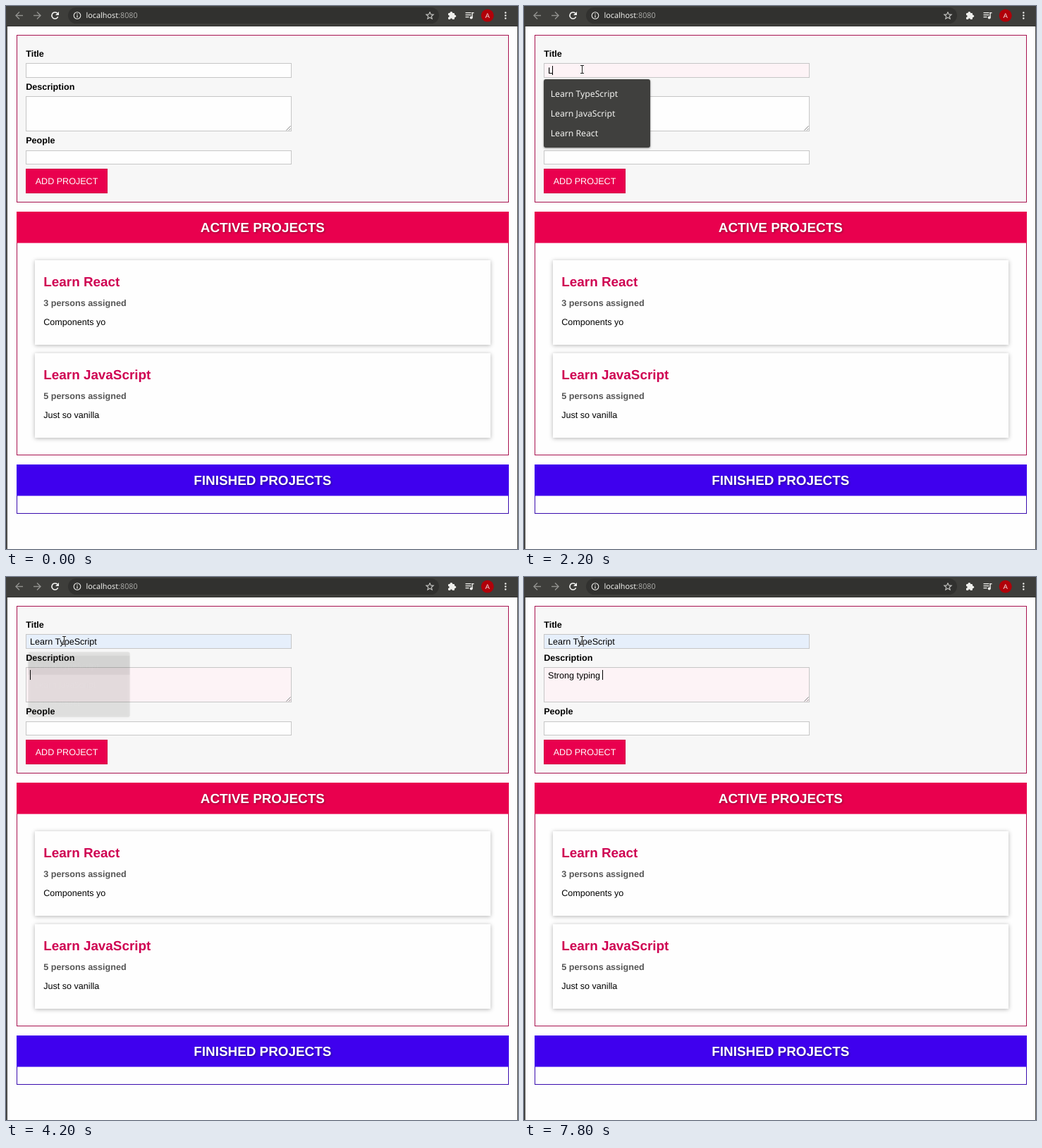
An HTML page with a canvas that plays this animation: 726 px wide and 771 px high, repeating every 8 s.

```html
<!DOCTYPE html>
<html lang="en">
<head>
<meta charset="utf-8">
<title>Project form</title>
<style>
  html, body { margin: 0; width: 100%; height: 100%; overflow: hidden; background: #fefefe; }
  canvas { display: block; }
</style>
</head>
<body>
<canvas id="stage" width="726" height="771"></canvas>
<script>
const ctx = document.getElementById('stage').getContext('2d');
const LOOP = 8000;
const SANS = '"Liberation Sans", Arial, sans-serif';
const UI = '"Noto Sans", "Open Sans", sans-serif';
const BODY = `12.57px ${SANS}`;
const BOLD = `bold 12.57px ${SANS}`;
const HEAD = `bold 18.86px ${SANS}`;
const PINK = '#e9004e', EDGE = '#a8124f', BLUE = '#3f00ee';
const BLUSH = '#fdf3f6', AUTOFILL = '#e6effb';

const ALL = ['Javascript', 'asdfasdfa', 'asdfasdfas', 'Learn TypeScript', 'ddddd', 'fff'];
const MATCHES = ['Learn TypeScript', 'Learn JavaScript', 'Learn React'];

// Step tracks: [start in ms, value], each value held until the next.
const TITLE = [[0, ''], [2200, 'L'], [2300, 'Le'], [2500, 'Lea'], [2600, 'Learn'],
  [2700, 'Learn '], [4000, 'Learn TypeScript']];
const NOTE = [[0, ''], [5500, 'S'], [5700, 'St'], [5800, 'Str'], [6000, 'Stron'], [6100, 'Strong'],
  [6400, 'Strong '], [7200, 'Strong ty'], [7300, 'Strong typ'], [7500, 'Strong typi'],
  [7600, 'Strong typin'], [7700, 'Strong typing'], [7800, 'Strong typing ']];
const FOCUS = [[0, ''], [1200, 'title'], [4000, 'note']];
const CARET = [[0, true], [3300, false], [4000, true], [4500, false], [5000, true],
  [5200, false], [5500, true]];
const POINTER = [[0, null], [800, [43, 84]], [900, [68, 86]], [1100, [82, 90]]];
// Menu values: [opacity, scale]
const MENU = [[0, [0, 1]], [1300, [0.3, 0.97]], [1400, [0.8, 0.99]], [1500, [1, 1]],
  [4000, [0.9, 1]], [4100, [0.5, 0.98]], [4200, [0.09, 0.955]], [4500, [0, 1]]];

function at(track, t) {
  let value;
  for (const [start, v] of track) if (t >= start) value = v;
  return value;
}

function rect(x, y, w, h, color) {
  ctx.fillStyle = color;
  ctx.fillRect(x, y, w, h);
}

function box(x, y, w, h, fill, edge) {
  rect(x, y, w, h, fill);
  ctx.strokeStyle = edge;
  ctx.lineWidth = 1;
  ctx.strokeRect(x + 0.5, y + 0.5, w - 1, h - 1);
}

function pill(x, y, w, h, r, color) {
  ctx.fillStyle = color;
  ctx.beginPath();
  ctx.roundRect(x, y, w, h, r);
  ctx.fill();
}

function dot(x, y, r, color) {
  ctx.fillStyle = color;
  ctx.beginPath();
  ctx.arc(x, y, r, 0, 7);
  ctx.fill();
}

function line(color, width, ...points) {
  ctx.strokeStyle = color;
  ctx.lineWidth = width;
  ctx.beginPath();
  for (const [x, y] of points) ctx.lineTo(x, y);
  ctx.stroke();
}

function text(str, x, y, font, color, align = 'left') {
  ctx.font = font;
  ctx.fillStyle = color;
  ctx.textAlign = align;
  ctx.fillText(str, x, y);
}

function shadow(color, blur, x, y, draw) {
  ctx.save();
  ctx.shadowColor = color;
  ctx.shadowBlur = blur;
  ctx.shadowOffsetX = x;
  ctx.shadowOffsetY = y;
  draw();
  ctx.restore();
}

function arrow(x, dir) {
  const tip = x + 5 * dir, color = '#92928f';
  line(color, 1.4, [x - 5 * dir, 13.5], [tip, 13.5]);
  line(color, 1.4, [x, 8.5], [tip, 13.5], [x, 18.5]);
}

function reload() {
  const white = '#f2f2f0';
  ctx.strokeStyle = white;
  ctx.lineWidth = 1.6;
  ctx.beginPath();
  ctx.arc(69.5, 13.5, 4.5, 0.4, 5.5);
  ctx.stroke();
  ctx.fillStyle = white;
  ctx.beginPath();
  ctx.moveTo(75, 8);
  ctx.lineTo(75, 13);
  ctx.lineTo(70, 13);
  ctx.fill();
}

function star(cx, cy) {
  const points = [];
  for (let i = 0; i <= 10; i++) {
    const a = i * Math.PI / 5 - Math.PI / 2, r = i % 2 ? 2.4 : 5.4;
    points.push([cx + r * Math.cos(a), cy + r * Math.sin(a)]);
  }
  line('#c8c8c5', 1.1, ...points);
}

function toolbar() {
  const bar = '#3e3e3b', light = '#efefec';
  rect(0, 0, 726, 28, bar);
  rect(0, 28, 726, 1, '#343432');
  arrow(19, -1);
  arrow(44, 1);
  reload();
  pill(88, 2, 526, 23, 11.5, '#31312f');

  ctx.strokeStyle = light;
  ctx.lineWidth = 1.1;
  ctx.beginPath();
  ctx.arc(101, 13.5, 4.8, 0, 7);
  ctx.stroke();
  rect(100.4, 10.7, 1.2, 1.3, light);
  rect(100.4, 13, 1.2, 3.4, light);

  const font = `10.8px ${UI}`;
  text('localhost', 113.5, 17, font, light);
  text(':8080', 113.5 + ctx.measureText('localhost').width, 17, font, '#a4a4a1');
  star(601, 13.8);

  pill(627, 10, 9, 9, 1, light);
  dot(631.3, 9.8, 1.9, light);
  dot(636.2, 14.3, 1.9, light);
  dot(627.2, 14.5, 1.4, '#3e3e3b');
  dot(631.4, 18.8, 1.4, '#3e3e3b');

  for (const [y, w] of [[9, 8], [12, 8], [15, 5]]) rect(651.5, y, w, 1.3, light);
  rect(660.5, 9, 1.3, 7.5, light);
  rect(660.5, 9, 3, 1.3, light);
  dot(659.7, 16.5, 2, light);

  dot(682.7, 13.6, 9, '#b00009');
  text('A', 682.7, 17, `9.5px ${SANS}`, '#f4e4e4', 'center');
  for (const y of [9.5, 13.5, 17.5]) dot(708.3, y, 1.2, light);
}

function section(y, h, label, color, edge) {
  box(15, y, 698, h, '#fefefe', edge);
  rect(15, y, 698, 44.5, color);
  shadow('rgba(0,0,0,.4)', 3, 1, 1, () => text(label, 363.8, y + 29, HEAD, '#fff', 'center'));
}

function card(y, title, people, note) {
  shadow('rgba(0,0,0,.3)', 6, 0, 1, () => rect(41, y, 646, 120, '#fefefe'));
  text(title, 53.3, y + 37, HEAD, '#cf0052');
  text(`${people} persons assigned`, 53.3, y + 65, BOLD, '#555');
  text(note, 53.3, y + 92, BODY, '#000');
}

function field(x, y, h, fill) {
  box(x, y, 377, h, fill, '#c6c6c6');
}

function typed(str, top, baseline, height, caret) {
  text(str, 34, baseline, BODY, '#000');
  if (caret) rect(Math.floor(34 + ctx.measureText(str).width), top, 1, height, '#000');
}

function form(t) {
  const focus = at(FOCUS, t), caret = at(CARET, t);
  const titleFill = t >= 4000 ? AUTOFILL : focus === 'title' ? BLUSH : '#fefefe';
  box(15, 41, 698, 238, '#f7f7f7', EDGE);

  text('Title', 28.2, 72.3, BOLD, '#000');
  field(28, 81, 21, titleFill);
  typed(at(TITLE, t), 85, 96, 13, focus === 'title' && caret);

  text('Description', 28.2, 119.3, BOLD, '#000');
  field(28, 128, 50, focus === 'note' ? BLUSH : '#fefefe');
  line('#777', 0.9, [397.5, 176.5], [403.5, 170.5]);
  line('#777', 0.9, [401, 176.5], [403.5, 174]);
  typed(at(NOTE, t), 132, 143.7, 14, focus === 'note' && caret);

  text('People', 28.2, 195.3, BOLD, '#000');
  field(28, 205, 20, '#fefefe');

  box(28, 231, 116, 35, PINK, '#d30049');
  text('ADD PROJECT', 86, 252.5, BODY, '#fff', 'center');
}

function menu(t) {
  const [opacity, scale] = at(MENU, t);
  if (!opacity) return;
  const items = t < 2200 ? ALL : MATCHES;
  const h = 12.6 + items.length * 28.15, cx = 103.5, cy = 104 + h / 2;
  ctx.save();
  ctx.globalAlpha = opacity;
  ctx.translate(cx, cy);
  ctx.scale(scale, scale);
  ctx.translate(-cx, -cy);
  shadow('rgba(0,0,0,.45)', 3, 0, 1, () => pill(28, 104, 151, h, 3, '#40403e'));
  if (t >= 3700) rect(28, 110, 151, 28, '#646462');
  items.forEach((item, i) => text(item, 37.7, 128.6 + i * 28.15, `500 12.2px ${UI}`, '#f3f3f1'));
  ctx.restore();
}

function pointer(t) {
  const pos = at(POINTER, t);
  if (!pos) return;
  const [x, y] = pos;
  for (const [color, width] of [['rgba(255,255,255,.7)', 2.4], ['#222', 1]]) {
    line(color, width, [x + 0.5, y - 5], [x + 0.5, y + 5]);
    for (const end of [-5.5, 5.5]) line(color, width, [x - 2, y + end], [x + 3, y + end]);
  }
}

function draw() {
  const t = performance.now() % LOOP;
  ctx.textRendering = 'geometricPrecision';
  rect(0, 0, 726, 771, '#fefefe');
  rect(0, 28, 2, 743, '#4a4a48');
  rect(725, 28, 1, 743, '#4a4a48');
  toolbar();
  form(t);
  section(292, 346, 'ACTIVE PROJECTS', PINK, EDGE);
  card(361, 'Learn React', 3, 'Components yo');
  card(493, 'Learn JavaScript', 5, 'Just so vanilla');
  section(651, 70, 'FINISHED PROJECTS', BLUE, '#3a0cae');
  menu(t);
  pointer(t);
  requestAnimationFrame(draw);
}

draw();
</script>
</body>
</html>
```
